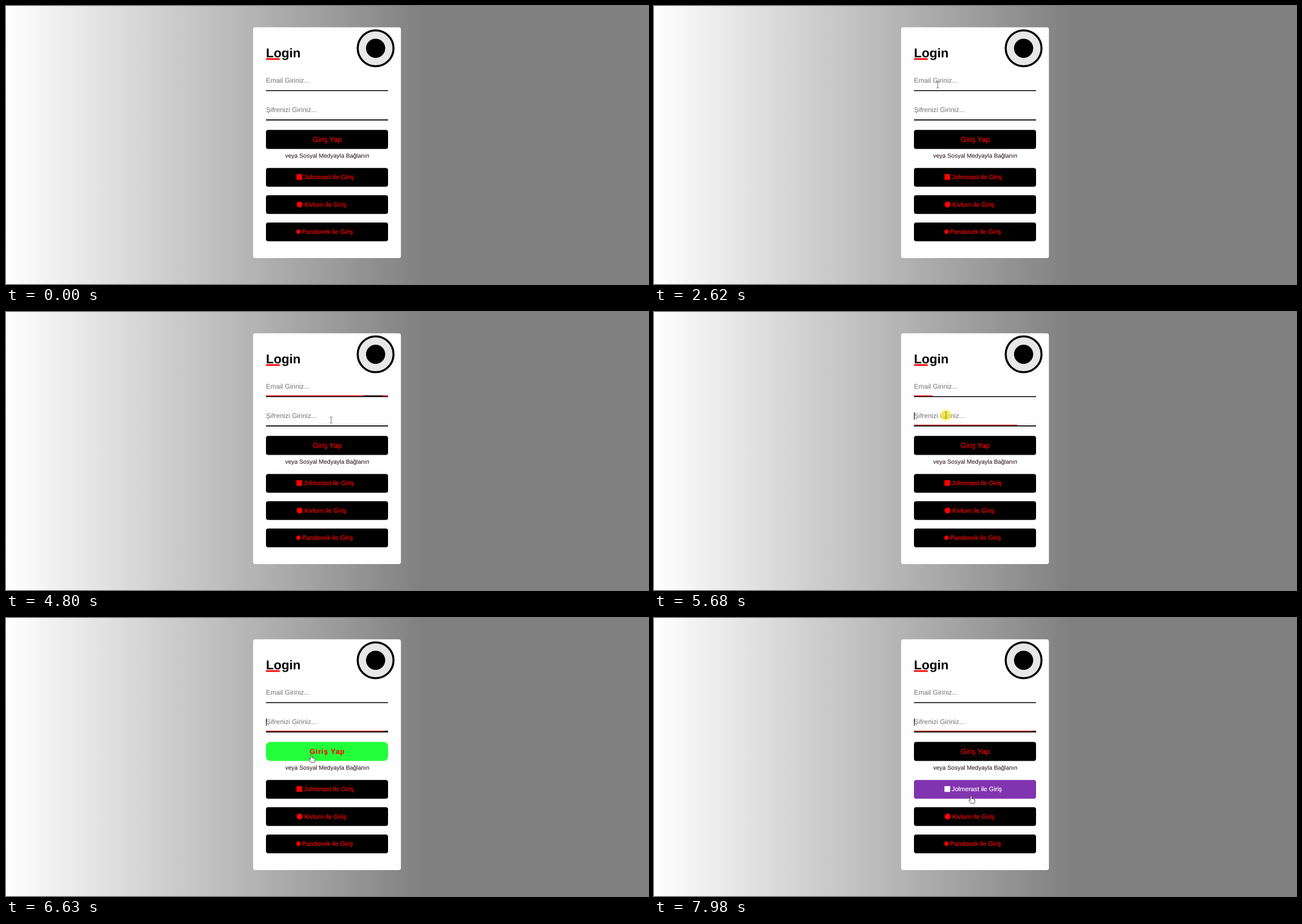
An HTML page that plays this animation: 1136x493 px, repeating every 8000 ms.

```html
<!DOCTYPE html>
<html lang="tr">
<head>
<meta charset="utf-8">
<title>Login</title>
<style>
  html, body { margin: 0; width: 100%; height: 100%; overflow: hidden; background: #808080; }
  svg { display: block; width: 1136px; height: 493px; }
  text { font-family: "Liberation Sans", Arial, sans-serif; text-rendering: geometricPrecision; }
  .hint { font-size: 12px; fill: #757575; }
  .red { fill: #f00; }
  .label { font-size: 11.2px; fill: #f00; stroke: #f00; stroke-width: .2px; }
  .hover .label { fill: #fff; stroke: #fff; }
  .hover .box { fill: #8134af; }
  #send { font-size: 12.8px; text-anchor: middle; }
  #send text { fill: #f00; stroke: #f00; stroke-width: .15px; }
  #send.hover { font-size: 12.6px; font-weight: bold; letter-spacing: .9px; }
  #send.hover .box { fill: #23ff3a; rx: 8px; }
  .pointer path { fill: #fff; stroke: #222; stroke-width: .8px; stroke-linejoin: round; }
  .pointer #beam { fill: none; stroke: #444; }
</style>
</head>
<body>
<svg viewBox="0 0 1136 493">
  <defs>
    <linearGradient id="bg" gradientUnits="userSpaceOnUse" x1="0" y1="0" x2="738" y2="0">
      <stop offset="0" stop-color="#fff"/>
      <stop offset="1" stop-color="#808080"/>
    </linearGradient>
  </defs>
  <rect width="1136" height="493" fill="url(#bg)"/>
  <rect x="437.2" y="37.7" width="261.6" height="409.3" rx="4" fill="#fefefe"/>

  <circle cx="654" cy="75" r="31.7" fill="#e7e7e8" stroke="#000" stroke-width="3.6"/>
  <circle cx="654" cy="75" r="17"/>

  <rect class="red" x="460" y="92.6" width="24.5" height="2.9"/>
  <text x="460" y="91.3" font-size="22.5" font-weight="bold">Login</text>

  <g id="fields"></g>
  <rect id="caret" x="460" width="1" height="13.5"/>

  <g id="send">
    <rect class="box" x="460" y="219.7" width="216" height="33.8" rx="4"/>
    <text x="568.4" y="241">Giriş Yap</text>
  </g>
  <text x="494" y="269.2" font-size="10.5" fill="#1e0810">veya Sosyal Medyayla Bağlanın</text>
  <g id="socials"></g>

  <circle id="click" r="9.5" fill="#fbee00" fill-opacity=".62"/>
  <g id="pointer" class="pointer">
    <path id="arrow" d="M.5 .5V10.8L2.9 8.6 4.6 12.4 6.2 11.7 4.6 8H7.6Z"/>
    <path id="beam" d="M-2.5-5.5H-1L0-4.7 1-5.5H2.5M0-4.7V4.7M-2.5 5.5H-1L0 4.7 1 5.5H2.5"/>
    <path id="hand" d="M-1.2 8V1Q-1.2 0 0 0T1.2 1V5Q2.2 4.4 3.2 5.4Q4.4 4.8 5.2 6Q6.8 5.8 6.8 7.4V9.5Q6.6 11.5 5.4 13.2H-.4Q-1.4 11-3.4 9Q-4.4 7.4-3.4 6.8Q-2.2 6.8-1.2 8Z"/>
  </g>
</svg>
<script>
const LOOP = 8000, START = 590, TICK = 67.8;
const MAIL_CLICK = 36, PASS_CLICK = 73, CLICK_TICKS = 5, BLINK_TICKS = 8;
const FIELD_GAP = 52, SOCIAL_TOP = 287.2, SOCIAL_GAP = 48.35;
const $ = id => document.getElementById(id);
const set = (node, attrs) => { for (const a in attrs) node.setAttribute(a, attrs[a]); };
const show = (node, on) => set(node, { visibility: on ? 'visible' : 'hidden' });
const inside = (v, a, b) => v >= a && v < b;
const clamp = v => Math.min(1, Math.max(0, v));

$('fields').innerHTML = ['Email Giriniz...', 'Şifrenizi Giriniz...'].map((hint, i) => `
  <g transform="translate(460 ${i * FIELD_GAP})">
    <text class="hint" y="136">${hint}</text>
    <rect class="bar red" y="147.9" height="1.8"/>
    <rect class="gap" y="147.9" height="1.8"/>
    <rect y="149.2" width="216" height="1.8" fill="${i ? '#000' : '#2a2428'}"/>
  </g>`).join('');

const socials = [
  ['Jolmerast', 526.8, '<rect class="label" x="514" y="11" width="10" height="10"/>'],
  ['Kivlurn', 528, '<circle class="label" cx="519.5" cy="16.4" r="5.2"/>'],
  ['Pandovek', 524, '<circle class="label" cx="517.5" cy="16.4" r="3.8"/>']
];
$('socials').innerHTML = socials.map(([name, x, mark], i) => `
  <g transform="translate(0 ${SOCIAL_TOP + i * SOCIAL_GAP})">
    <rect class="box" x="460" width="216" height="33.3" rx="4"/>
    ${mark}<text class="label" x="${x}" y="20.2">${name} ile Giriş</text>
  </g>`).join('');

const bars = document.querySelectorAll('.bar');
const gaps = document.querySelectorAll('.gap');
const firstSocial = $('socials').firstElementChild;

// Pointer moves: first tick, last tick, where it arrives
const moves = [
  [0, 2, 852, 216], [6, 9, 645, 106],
  [12, 18, 540, 67], [18, 21, 477, 102], [21, 24, 494, 140], [28, 32, 510, 139.5],
  [47, 53, 519, 183], [59, 61, 634, 200], [61, 63, 516.5, 183],
  [80, 83, 530.5, 231], [83, 89, 540, 243], [95, 98, 553, 266], [98, 109, 561, 315.5]
];

function pointerAt(k) {
  let x = 1056, y = 435;
  for (const [from, to, tx, ty] of moves) {
    const f = clamp((k - from) / (to - from));
    x += (tx - x) * f;
    y += (ty - y) * f;
  }
  return [x, y];
}

// CSS "ease" curve, solved by bisection
function ease(p) {
  if (p <= 0 || p >= 1) return clamp(p);
  const bez = (a, b, u) => 3 * a * u * (1 - u) ** 2 + 3 * b * u * u * (1 - u) + u ** 3;
  let lo = 0, hi = 1;
  for (let i = 0; i < 20; i++) {
    const mid = (lo + hi) / 2;
    if (bez(.25, .25, mid) < p) lo = mid; else hi = mid;
  }
  return bez(.1, 1, lo);
}

const focus = (k, click) => ease((k - click + .43) * TICK / 300);

function drawPointer(k, x, y) {
  const inCard = inside(x, 460, 676);
  const onSend = inCard && inside(y, 219.7, 253.5);
  const onSocial = inCard && inside(y, SOCIAL_TOP, SOCIAL_TOP + 33.3);
  const onField = inCard && (inside(y, 122, 151) || inside(y, 172, 199));
  const onNote = inside(x, 494, 642) && inside(y, 258, 274);
  const kind = onSend || onSocial ? 'hand' : onField || onNote ? 'beam' : 'arrow';
  for (const name of ['arrow', 'beam', 'hand']) show($(name), k >= 0 && kind === name);
  set($('pointer'), { transform: `translate(${x} ${y})` });
  $('send').classList.toggle('hover', onSend);
  firstSocial.classList.toggle('hover', onSocial);
}

function drawFields(k) {
  const inPass = k >= PASS_CLICK;
  const blink = k - (inPass ? PASS_CLICK : MAIL_CLICK);
  show($('caret'), blink >= 0 && Math.floor(blink / BLINK_TICKS) % 2 === 0);
  set($('caret'), { y: 125.7 + (inPass ? FIELD_GAP : 0) });

  const pass = focus(k, PASS_CLICK);
  set(bars[0], { width: 216 * (focus(k, MAIL_CLICK) - pass) });
  set(bars[1], { width: 216 * pass });
  // Short stretches of the finished bars stay black
  set(gaps[0], { x: 173, width: inside(k, MAIL_CLICK + 4, PASS_CLICK) ? 33 : 0 });
  set(gaps[1], { x: 210, width: k >= PASS_CLICK + 4 ? 6 : 0 });
}

function draw(t) {
  const k = Math.floor((t - START + 14) / TICK);
  const [x, y] = pointerAt(k);
  drawPointer(k, x, y);
  drawFields(k);
  show($('click'), [MAIL_CLICK, PASS_CLICK].some(c => inside(k, c, c + CLICK_TICKS)));
  set($('click'), { cx: x, cy: y });
}

const origin = performance.now();
function frame() {
  draw((performance.now() - origin) % LOOP);
  requestAnimationFrame(frame);
}
draw(0);
requestAnimationFrame(frame);
</script>
</body>
</html>
```
